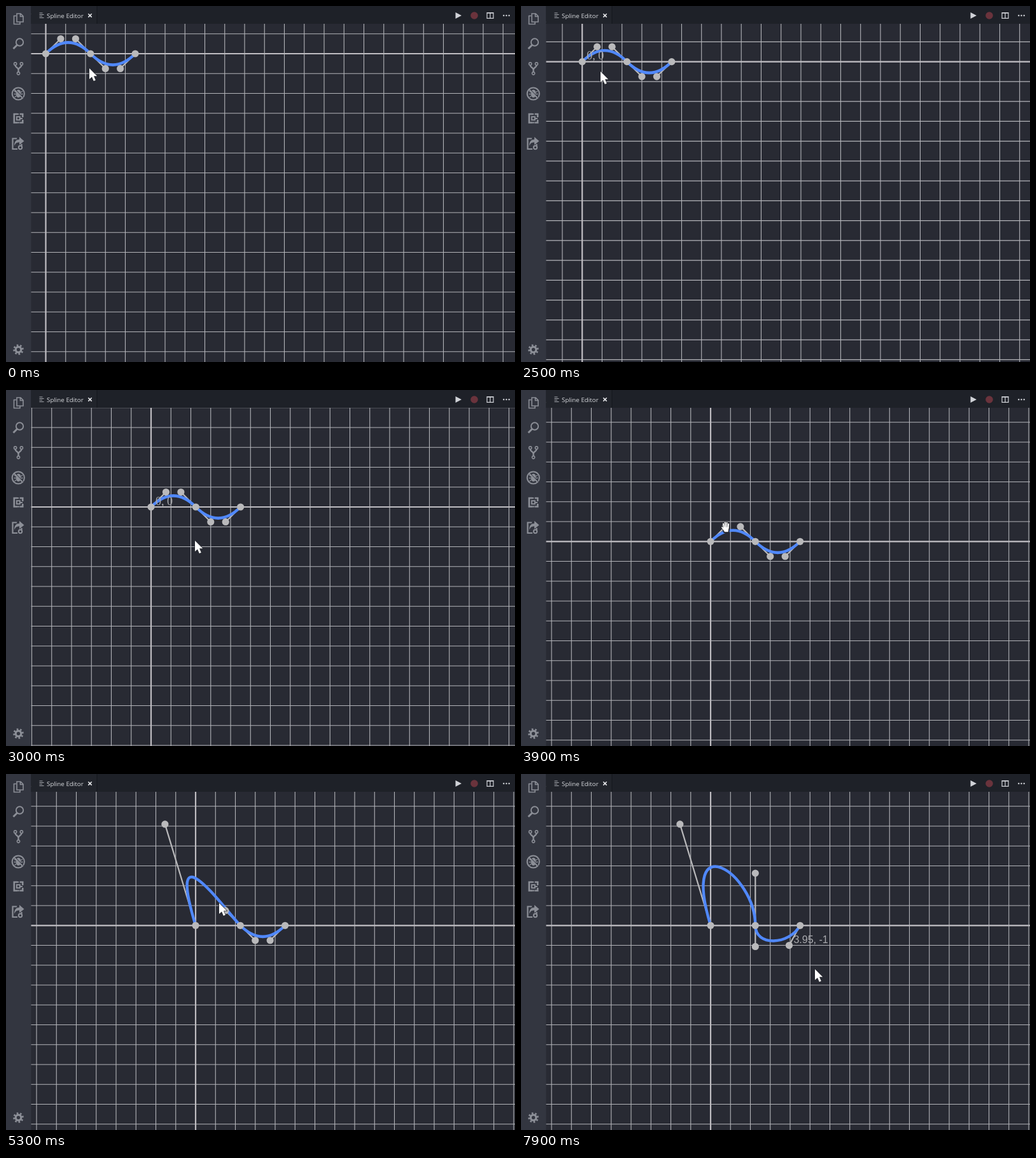
Recreate the animation shown at these times as an HTML page with a canvas. Size 800 by 560 pixels, loop 8000 ms.

```html
<!DOCTYPE html>
<html lang="en">
<head>
<meta charset="utf-8">
<title>Spline Editor</title>
<style>
  html, body { margin: 0; width: 800px; height: 560px; overflow: hidden; background: #282a33; }
  canvas { display: block; }
</style>
</head>
<body>
<canvas id="stage" width="800" height="560"></canvas>
<script>
const ctx = document.getElementById('stage').getContext('2d');
const LOOP = 8000, STEP = 100, UNIT = 31.25;
const LINE = '#b3b4b9', DOT = '#b9b9bb', ICON = '#8c8f97', LIGHT = '#d0d2d7';

// Keys are [time, x, y]; cursor and origin in pixels, handles in grid units.
const cursorKeys = [
  [0, 131, 98], [500, 60, 70], [700, 60, 71], [800, 59, 72], [1600, 59, 72], [1700, 61, 74],
  [2200, 61, 74], [2300, 74, 79], [2400, 96, 87], [2500, 125, 103], [2800, 288, 228],
  [2900, 297, 237], [3400, 297, 237], [3800, 322, 215], [4050, 322, 215], [4500, 244, 72],
  [4700, 250, 79], [5000, 250, 79], [5300, 335, 203], [5500, 344, 214], [5850, 344, 214],
  [6300, 368, 156], [6900, 368, 156], [7500, 414, 261], [7700, 414, 261], [7900, 462, 307]
];
const originKeys = [
  [2200, 62.5, 75], [2300, 70, 77.5], [2400, 81, 81.5], [2500, 96.2, 87.6], [2800, 163.3, 132],
  [3000, 228, 184], [3200, 283, 227], [3300, 298, 238.3]
];
const firstKeys = [[4100, .75, .75], [4700, -1.72, 5.3], [4900, -1.54, 5.1]];
const secondKeys = [[5900, 1.5, .75], [6500, 2.25, 2.63]];
const fourthKeys = [[7750, 3.75, -.75], [7900, 3.95, -1]];

function track(keys, t) {
  const next = keys.findIndex(k => k[0] > t);
  if (next === 0) return keys[0].slice(1);
  if (next < 0) return keys[keys.length - 1].slice(1);
  const [t0, x0, y0] = keys[next - 1], [t1, x1, y1] = keys[next];
  const u = (t - t0) / (t1 - t0);
  return [x0 + (x1 - x0) * u, y0 + (y1 - y0) * u];
}

function rect(color, x, y, w, h) {
  ctx.fillStyle = color;
  ctx.fillRect(x, y, w, h);
}

function disc(color, x, y, r) {
  ctx.fillStyle = color;
  ctx.beginPath();
  ctx.arc(x, y, r, 0, 7);
  ctx.fill();
}

function stroke(color, width, path) {
  ctx.strokeStyle = color;
  ctx.lineWidth = width;
  ctx.stroke(new Path2D(path));
}

function fill(color, path) {
  ctx.fillStyle = color;
  ctx.fill(new Path2D(path));
}

function text(color, font, string, x, y) {
  ctx.fillStyle = color;
  ctx.font = font;
  ctx.fillText(string, x, y);
}

function ring(x, y, r, width) {
  stroke(ICON, width, `M${x - r} ${y}a${r} ${r} 0 1 0 ${2 * r} 0a${r} ${r} 0 1 0 ${-2 * r} 0`);
}

function drawGrid(ox, oy) {
  let lines = '';
  for (let x = ox % UNIT; x < 800; x += UNIT) lines += `M${x} 28V560`;
  for (let y = oy % UNIT; y < 560; y += UNIT) lines += `M39 ${y}H800`;
  stroke(LINE, 1.1, lines);
  stroke('#bfbdc2', 2.2, `M${ox} 28V560M39 ${oy}H800`);
}

function drawSidebar() {
  rect('#333640', 0, 0, 39.5, 560);
  // Files, search, branches
  stroke(ICON, 1.6, 'M17 12h6l4 4v9H17zM22.5 12v4.5H27M16 15.5h-3.5v13H22v-3');
  ring(21.5, 57, 5.7, 1.9);
  stroke(ICON, 3, 'M17.3 61.5L11.5 67.2');
  ring(14.6, 91, 2.1, 1.6);
  ring(24.4, 91, 2.1, 1.6);
  ring(19.5, 106, 2.1, 1.6);
  stroke(ICON, 2.3, 'M14.6 93.5c0 3 4.9 3 4.9 7V104M24.4 93.5c0 3-4.9 3-4.9 7');
  // Debug
  ring(19.3, 138, 9.6, 2);
  fill(ICON, 'M16 135.5c0-5 7-5 7 0v4c0 6-7 6-7 0z');
  stroke(ICON, 1.3, 'M13 134l3 2M26 134l-3 2M12.5 138.5h14M13.5 143.5l3-2.5M25.5 143.5l-3-2.5');
  stroke('#333640', 1.2, 'M14 131l13 13');
  stroke(ICON, 2, 'M12.7 131.3L26 144.7');
  // Extensions
  stroke(ICON, 2.6, 'M18 170h-5.2v13.5H18M21.5 183.5h4.7V179M21.5 170h4.7v5');
  stroke(ICON, 2, 'M16.8 174.2h5v5h-5zM18 170h2M18 183.5h3M22 177h4');
  // Share
  stroke(ICON, 2.2, 'M17 208.5h-6.5v16.5H18M24.5 217v3');
  fill(ICON, 'M13 220c0-7 3-10 8-10v-4l7.5 6.5-7.5 6v-4c-4 0-6 1-8 5.5z');
  ring(22.5, 222.5, 2.7, 2);
  // Settings
  ctx.setLineDash([2.6, 2.9]);
  ring(19.5, 540.5, 7, 2.6);
  ctx.setLineDash([]);
  ring(19.5, 540.5, 4.3, 3.2);
}

function drawTitleBar() {
  rect('#1e2128', 39.5, 0, 761, 28);
  rect('#21242b', 39.5, 0, 103.5, 28);
  rect('#15171c', 142.5, 0, 1, 28);
  stroke('#a4a7ad', 1, 'M52.5 11h5M52.5 13.5h7M52.5 16h4.5M52.5 18.5h7');
  text('#d8dade', '9.8px "Open Sans", sans-serif', 'Spline Editor', 64, 18.5);
  stroke('#e8e9ec', 1.6, 'M129.3 12.2l5.4 5.4M134.7 12.2l-5.4 5.4');
  fill(LIGHT, 'M706.5 10l9.5 5-9.5 5z');
  disc('#6a333c', 736, 15, 5.8);
  stroke(LIGHT, 1.2, 'M756 10.7h10v8.6h-10zM761 10.7v8.6M756 11.2h10');
  for (const x of [782.3, 786.5, 790.7]) disc(LIGHT, x, 15, 1.2);
}

function drawCursor([x, y], grabbing) {
  ctx.save();
  ctx.translate(x, y);
  ctx.lineJoin = ctx.lineCap = 'round';
  if (grabbing) {
    const fingers = 'M-4-4.5L-3 2M-1.3-6.7L-1 1M1.5-6.3L1.4 1M4.2-4.3L3.6 2M-5.9 1.2L-2 6';
    const palm = 'M-4.2 1H4.7L3.6 8.2H-2.2z';
    stroke('#23252c', 3.6, fingers + palm);
    stroke('#fff', 2, fingers);
    fill('#fff', palm);
  } else {
    const arrow = 'M0 0V17L4 13.4 6.8 20 9.8 18.7 7 12.3H12.2z';
    stroke('#23252c', 1.4, arrow);
    fill('#fff', arrow);
  }
  ctx.restore();
}

function draw(t) {
  const [ox, oy] = track(originKeys, t);
  const toScreen = ([x, y]) => [ox + x * UNIT, oy - y * UNIT];
  const middle = [2.25, 0];
  const first = track(firstKeys, t), second = track(secondKeys, t), fourth = track(fourthKeys, t);
  // The handle opposite the second one keeps its length and mirrors its direction.
  const dx = middle[0] - second[0], dy = -second[1];
  const scale = Math.hypot(.75, .75) / Math.hypot(dx, dy);
  const third = [middle[0] + dx * scale, dy * scale];
  const points = [[0, 0], first, second, middle, third, fourth, [4.5, 0]].map(toScreen);
  const [a, b, c, d, e, f, g] = points;

  rect('#282a33', 0, 0, 800, 560);
  drawGrid(ox, oy);
  stroke(DOT, 2.2, `M${a}L${b}M${c}L${d}L${e}M${f}L${g}`);
  stroke('#5088fb', 4.4, `M${a}C${b} ${c} ${d}C${e} ${f} ${g}`);
  for (const [x, y] of points) disc(DOT, x, y, 5.6);

  const drags = [[2300, 3300, [0, 0]], [4100, 4900, first], [5900, 6700, second], [7800, LOOP, fourth]];
  const drag = drags.find(([start, end]) => t >= start && t < end);
  if (drag) {
    const value = drag[2];
    const [x, y] = toScreen(value);
    const font = drag === drags[0] ? '18px "Liberation Serif", serif' : '16px "Liberation Sans", sans-serif';
    text('#a9aaae', font, value.map(v => +v.toFixed(2)).join(', '), x + 7, y - 3.5);
  }

  drawSidebar();
  drawTitleBar();
  const cursor = track(cursorKeys, Math.max(t, 0));
  drawCursor(cursor, points.some(([x, y]) => Math.hypot(x - cursor[0], y - cursor[1]) < 4));
}

function tick() {
  draw(Math.floor(performance.now() % LOOP / STEP) * STEP);
  requestAnimationFrame(tick);
}
tick();
</script>
</body>
</html>
```
